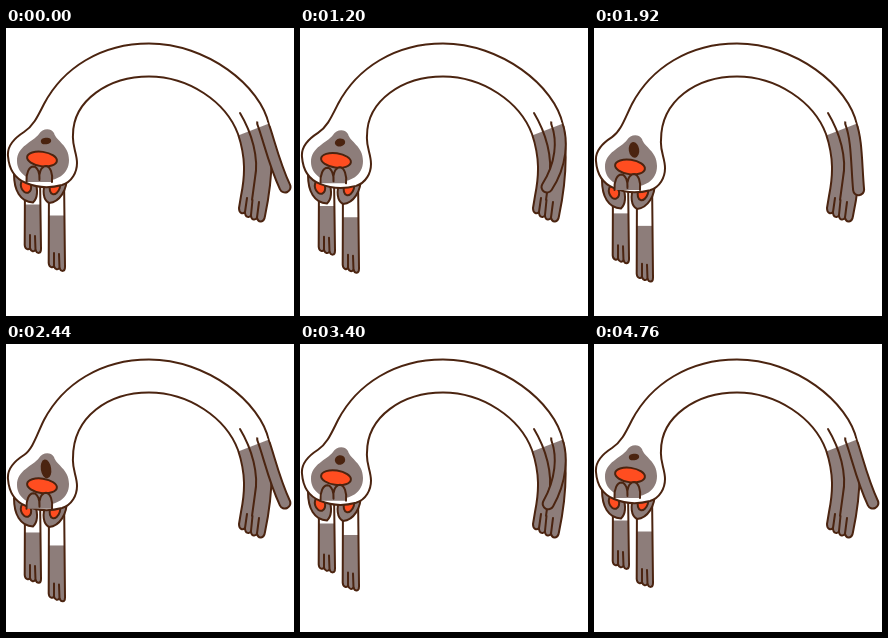
An HTML page with a canvas for the animation above (4800 ms loop, 288x288 px).

```html
<!DOCTYPE html>
<html>
<head>
<meta charset="utf-8">
<style>
html, body { margin: 0; width: 100%; height: 100%; overflow: hidden; background: #fff; }
canvas { display: block; width: 288px; height: 288px; }
</style>
</head>
<body>
<canvas id="stage" width="288" height="288"></canvas>
<script>
const ctx = document.getElementById('stage').getContext('2d');
const LOOP = 4800, STEP = 40;
const LINE = '#4b2410', GREY = '#8d7d7a', ORANGE = '#ff4d20', WHITE = '#fff';

// White before the point (x, y), grey beyond it along the unit direction.
function twoTone(x, y, dx, dy) {
  const g = ctx.createLinearGradient(x, y, x + dx, y + dy);
  g.addColorStop(0, WHITE);
  g.addColorStop(1, GREY);
  return g;
}

function paint(path, fill, line = true) {
  if (fill) {
    ctx.fillStyle = fill;
    ctx.fill(path);
  }
  if (line) {
    ctx.lineWidth = 2;
    ctx.strokeStyle = LINE;
    ctx.stroke(path);
  }
}

const shape = d => new Path2D(d);

function oval(x, y, rx, ry, tilt, fill) {
  const p = new Path2D();
  p.ellipse(x, y, rx, ry, tilt, 0, Math.PI * 2);
  paint(p, fill);
}

function frontLeg(x, w, split, foot) {
  const r = x + w;
  paint(shape(`M${x} 148 L${x - 0.3} ${foot - 8}
    C${x} ${foot - 3} ${x + 4} ${foot - 3} ${x + 5} ${foot - 5}
    C${x + 6} ${foot - 1} ${x + 9} ${foot - 1} ${x + 10.5} ${foot - 3}
    C${x + 12} ${foot + 1} ${r + 1} ${foot + 1} ${r + 1} ${foot - 4}
    L${r} 148`), twoTone(x, split, 0, 1));
  paint(shape(`M${x + 5} ${foot - 5} L${x + 5} ${foot - 18}
    M${x + 10.5} ${foot - 3} L${x + 10} ${foot - 17}`));
}

function ears(drop) {
  ctx.save();
  ctx.translate(0, drop);
  paint(shape('M8 146 C8 162 14 174 27 174.5 C32 170 32 162 29 152'), GREY);
  oval(20, 158, 5, 7, -0.3, ORANGE);
  paint(shape('M61 148 C61 162 54 174 43 175 C37 172 36 162 40 152'), GREY);
  oval(49, 158.5, 5, 8, 0.3, ORANGE);
  ctx.restore();
}

function body(drop) {
  const y = v => v + drop;
  paint(shape(`M263 97 C255 58 201 15.5 143 15.5 C95 15.5 57 40 38 76
    C31 90 27 ${y(98)} 18 ${y(104)} C7 ${y(111)} 1 ${y(118)} 2 ${y(128)}
    C3 ${y(142)} 10 ${y(151)} 20 ${y(155)} C32 ${y(160)} 45 ${y(160)} 56 ${y(157)}
    C66 ${y(154)} 71 ${y(144)} 71 ${y(135)} C71 ${y(125)} 66 ${y(118)} 67 ${y(107)}
    C67 72 103 48.5 143 48.5 C183 48.5 220 74 232 106
    C240 130 239 148 235 168 L233 180
    C233 186 237 186 239 184 C239 190 244 190 245 187
    C245 193 250 192 251 189.5 C252 195 258 195 259 188
    C267 150 267 120 263 97 Z`), twoTone(247.5, 101, 0.36, 0.93));
  paint(shape(`M234 85 C246 105 253 130 249 150 L246 172
    M239 184 L241 170 M245 187 L246.5 172 M251 189.5 L253 174`));
}

function face(drop, stretch) {
  ctx.save();
  ctx.translate(0, drop);
  paint(shape(`M33 106 C36 101 44 99 48 105 C50 113 63 117 63 132
    C63 147 50 153 37 153 C22 153 11 145 11 133 C11 118 27 114 33 106 Z`), GREY, false);
  oval(40, 113 + 4 * stretch, 4.2, 2.2 + 6.3 * stretch, -0.15, LINE);
  ctx.translate(0, 2.8 * stretch);
  oval(36, 131, 15, 7.2, 0.14, ORANGE);
  paint(shape(`M20.5 154 C20 145 23 138.5 27.5 138.5 C32 139 34 146 33.5 152
    C32.5 145 35 138.5 40 138 C44.5 138.5 47 146 46 154`), GREY);
  ctx.restore();
}

function tail(swing) {
  const tipX = 259.3 + 16 * swing + 3.7 * swing * swing;
  const tipY = 162 - 3 * swing * swing;
  const angle = (29 * swing - 4) * Math.PI / 180;
  const curve = new Path2D();
  curve.moveTo(256.7, 95);
  curve.bezierCurveTo(263, 112, tipX - 27 * Math.sin(angle), tipY - 27 * Math.cos(angle), tipX, tipY);
  ctx.save();
  ctx.clip(shape('M236 88.7 L288 104.7 V210 H200 Z'));
  ctx.lineWidth = 13;
  ctx.strokeStyle = LINE;
  ctx.stroke(curve);
  ctx.restore();
  ctx.lineWidth = 9;
  ctx.strokeStyle = twoTone(247.5, 101, 0.36, 0.93);
  ctx.stroke(curve);
}

function draw(time) {
  const turn = time / LOOP * Math.PI * 2;
  const stretch = ((1 - Math.cos(turn)) / 2) ** 3;
  ctx.fillStyle = WHITE;
  ctx.fillRect(0, 0, 288, 288);
  ctx.lineCap = ctx.lineJoin = 'round';
  frontLeg(19, 15, 176 + 12 * stretch, 225 + 14 * stretch);
  frontLeg(43, 15, 187 + 14 * stretch, 243 + 14.5 * stretch);
  ears(8 * stretch);
  body(7 * stretch);
  face(8 * stretch, stretch);
  tail(Math.cos(turn * 2));
}

function tick() {
  draw(Math.floor(performance.now() % LOOP / STEP) * STEP);
  requestAnimationFrame(tick);
}
tick();
</script>
</body>
</html>
```
